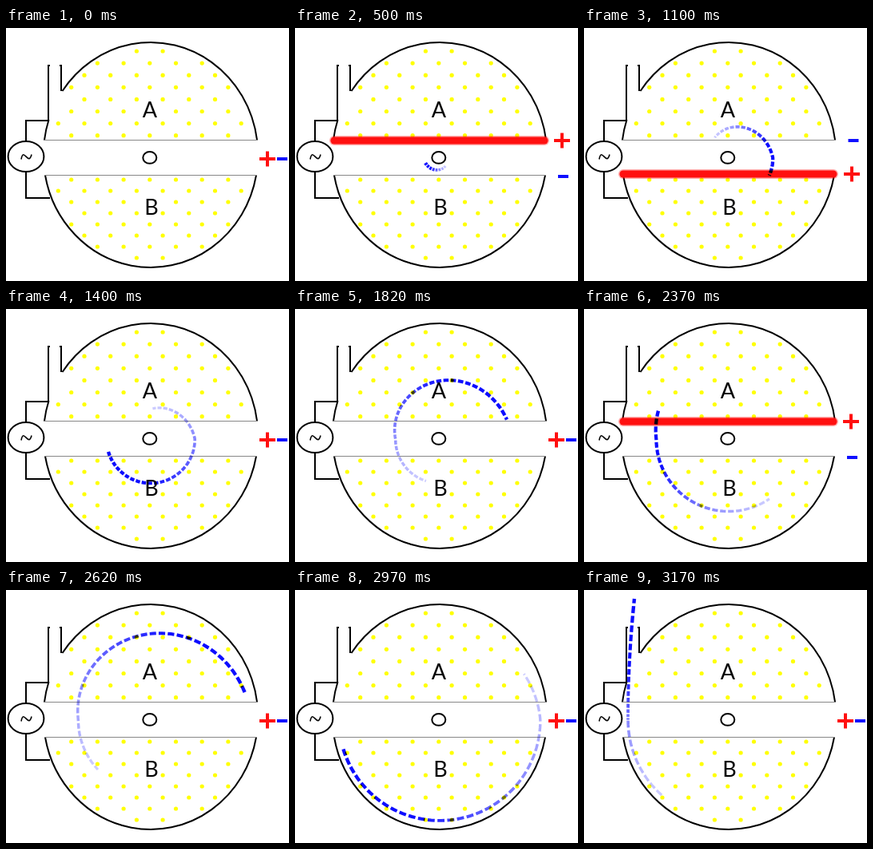
Recreate the animation shown at these times as an HTML page with a canvas. Size 354 by 317 pixels, loop 3220 ms.

```html
<!DOCTYPE html>
<html lang="en">
<head>
<meta charset="utf-8">
<title>Cyclotron</title>
<style>
html, body { margin: 0; width: 100%; height: 100%; overflow: hidden; background: #fff; }
canvas { display: block; width: 354px; height: 317px; }
</style>
</head>
<body>
<canvas id="stage" width="354" height="317"></canvas>
<script>
const ctx = document.getElementById('stage').getContext('2d');
const RED = '#ff1010', BLUE = '#1010ff', BLACK = '#000';
const CX = 181, CY = 159, RX = 134.2, RY = 141;
const TOP = 140.5, BOTTOM = 184.5;

// Three poses per half turn: crossing the gap, mid-dee, leaving the dee.
// The crossings get shorter as the particle speeds up.
const POSES = 23, START = 0.3;
const crossing = [150, 150, 120, 100, 100, 50, 50];

function poseTime(i) {
  if (i < 2) return 250;
  if (i === POSES - 1) return 50;
  return i % 3 ? 150 : crossing[i / 3 - 1];
}

const times = Array.from({ length: POSES }, (_, i) => poseTime(i));
const LOOP = times.reduce((a, b) => a + b);

function poseAt(t) {
  let i = 0;
  while (t >= times[i]) t -= times[i++];
  return i;
}

// Position after u half turns: the radius is constant in the lower dee
// and grows in the upper one; after seven half turns the particle leaves.
function orbit(u) {
  if (u > 7) {
    const f = (2 * (u - 7)) ** 1.4;
    return [55 + 8 * f * f, 163 - 152 * f];
  }
  const turns = Math.floor(u / 2) + Math.max(0, u % 2 - 1);
  const r = (20 + 35.3 * turns) * Math.min(1, 0.45 + 0.55 * u);
  return [181 + r * Math.cos(Math.PI * u), 163 + r * Math.sin(Math.PI * u)];
}

function line(color, width, ...pts) {
  ctx.strokeStyle = color;
  ctx.lineWidth = width;
  ctx.beginPath();
  pts.forEach(([x, y]) => ctx.lineTo(x, y));
  ctx.stroke();
}

function ring(x, y, rx, ry, from = 0, to = 2 * Math.PI) {
  ctx.strokeStyle = BLACK;
  ctx.lineWidth = 2;
  ctx.beginPath();
  ctx.ellipse(x, y, rx, ry, 0, from, to);
  ctx.stroke();
}

function dotRows(y0, pitch, shift) {
  ctx.fillStyle = '#ffff00';
  for (let row = 0; row < 8; row++) {
    const y = y0 + row * pitch;
    for (let x = 65.3 + (row + shift) % 2 * 16.4; x < 312; x += 32.7) {
      const inside = ((x - CX) / RX) ** 2 + ((y - CY) / RY) ** 2 < 0.95;
      const onLetter = Math.abs(x - 180) < 6 &&
        (Math.abs(y - 102) < 10 || Math.abs(y - 223) < 10);
      if (!inside || onLetter) continue;
      ctx.beginPath();
      ctx.arc(x, y, 2.6, 0, 2 * Math.PI);
      ctx.fill();
    }
  }
}

function drawMachine() {
  dotRows(29, 15.1, 0);
  dotRows(190, 14, 1);

  const edge = y => Math.asin((y - CY) / RY);
  ring(CX, CY, RX, RY, Math.PI - edge(79), 2 * Math.PI + edge(TOP));
  ring(CX, CY, RX, RY, Math.PI - edge(TOP), Math.PI - edge(115));
  ring(CX, CY, RX, RY, edge(BOTTOM), Math.PI - edge(BOTTOM));
  line('#888', 1, [48, TOP], [315, TOP]);
  line('#888', 1, [48, BOTTOM], [314, BOTTOM]);

  // Exit channel and supply wires
  line(BLACK, 2, [55, 47], [53, 47], [53, 116], [25, 116], [25, 142]);
  line(BLACK, 2, [67, 47], [69, 47], [69, 79]);
  line(BLACK, 2, [25, 180], [25, 213], [55, 213]);

  ring(25, 161, 22.4, 19);
  ctx.lineWidth = 1.6;
  ctx.beginPath();
  ctx.moveTo(19, 164.5);
  ctx.bezierCurveTo(22, 148, 28, 174, 32, 158.5);
  ctx.stroke();

  ring(179.8, 162.4, 8.5, 7.4);
  ctx.fillStyle = BLACK;
  ctx.font = '27px Lato, "Open Sans", sans-serif';
  ctx.textAlign = 'center';
  ctx.fillText('A', 180, 112);
  ctx.fillText('B', 182, 234);
}

function plus(x, y) {
  line(RED, 4, [x - 10, y], [x + 10, y]);
  line(RED, 4, [x, y - 9.5], [x, y + 9.5]);
}

function minus(x, y) {
  line(BLUE, 4, [x - 6.5, y], [x + 6.5, y]);
}

function plate(y) {
  ctx.lineCap = 'round';
  line('rgba(255,16,16,.35)', 12, [49, y], [312, y]);
  line(RED, 9, [49, y], [312, y]);
  ctx.lineCap = 'butt';
}

function drawCharge(i) {
  const live = i === 2 || (i > 0 && i % 3 === 0);
  if (!live) {
    plus(327, 164);
    minus(345.5, 164);
  } else if (Math.round(i / 3) % 2) {
    plate(141);
    plus(334, 141);
    minus(335.5, 186);
  } else {
    plate(183);
    plus(335, 183);
    minus(337, 141);
  }
}

function drawTrail(i) {
  const half = Math.floor(i / 3), phase = i % 3;
  const head = half + [0.13, 0.5, 0.91][phase];
  const span = [0.82, 0.77, 1.55 - 0.08 * half][phase];
  const tail = Math.max(START, head - span);

  ctx.globalCompositeOperation = 'multiply';
  for (let u = START; u < head;) {
    const pitch = (5 + u) / (Math.PI * (14 + 16 * u));
    const a = Math.max(u, tail), b = Math.min(u + pitch * 0.72, head);
    if (b > a) {
      const mid = (a + b) / 2, f = (mid - tail) / (head - tail);
      ctx.globalAlpha = 0.2 + 0.75 * Math.min(1, f / 0.7) ** 1.4;
      line('#0000ff', 3.2 + 1.2 * f, orbit(a), orbit(mid), orbit(b));
    }
    u += pitch;
  }
  ctx.globalAlpha = 1;
  ctx.globalCompositeOperation = 'source-over';
}

function draw(t) {
  const i = poseAt(t);
  ctx.fillStyle = '#fff';
  ctx.fillRect(0, 0, 354, 317);
  drawMachine();
  drawCharge(i);
  drawTrail(i);
}

let start;
function tick(now) {
  start ??= now;
  draw(Math.max(0, now - start) % LOOP);
  requestAnimationFrame(tick);
}
draw(0);
requestAnimationFrame(tick);
</script>
</body>
</html>
```
